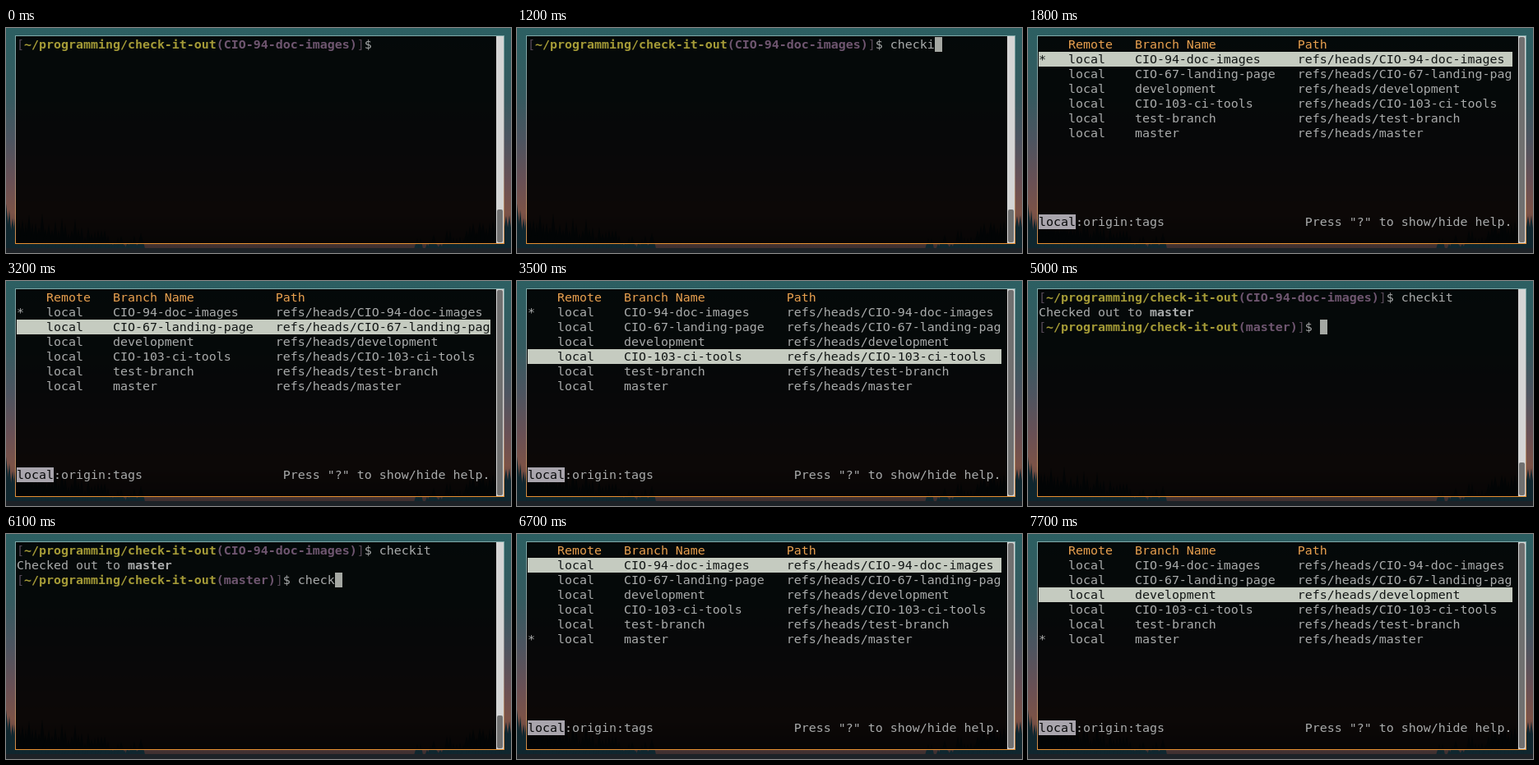
An HTML page with a canvas that plays this animation: 614 by 274 pixels, repeating every 8 s.

```html
<!DOCTYPE html>
<html lang="en">
<head>
<meta charset="utf-8">
<title>Branch picker in a terminal</title>
<style>
html, body { margin: 0; width: 100%; height: 100%; overflow: hidden; background: #12262c; }
canvas, #term, #thumb { position: absolute; }
canvas { left: 0; top: 0; }
#term {
  left: 13px; top: 11px; margin: 0; color: #a9abab;
  font: 14.95px/18px "DejaVu Sans Mono", monospace;
}
#term div { height: 18px; width: 576px; overflow: hidden; white-space: pre; }
#term span { display: inline-block; height: 18px; vertical-align: top; }
#term .dir { color: #a59b37; font-weight: bold; }
#term .branch { color: #6f5670; font-weight: bold; }
#term .edge { color: #574a58; }
#term .bold { font-weight: bold; }
#term .head { color: #e9a04f; }
#term .pick { background: #c5cbc0; color: #111514; }
#term .tab { background: #a9a5ad; color: #08090a; }
#term .cursor { background: #a5a8a3; }
#thumb { left: 597px; width: 7px; background: #707070; border-radius: 2px; }
</style>
</head>
<body>
<canvas id="scene" width="614" height="274"></canvas>
<pre id="term"></pre>
<div id="thumb"></div>
<script>
const LOOP = 8000;
const term = document.getElementById('term');
const thumb = document.getElementById('thumb');
const branches = ['CIO-94-doc-images', 'CIO-67-landing-page', 'development',
  'CIO-103-ci-tools', 'test-branch', 'master'];
const command = 'checkit';
const firstKeys = [400, 600, 800, 800, 1000, 1200, 1400];
const secondKeys = [...command].map((_, i) => 5700 + 100 * i);

function drawScene() {
  const g = document.getElementById('scene').getContext('2d');
  const gradient = (y0, y1, stops) => {
    const fill = g.createLinearGradient(0, y0, 0, y1);
    stops.forEach(([at, color]) => fill.addColorStop(at, color));
    return fill;
  };
  g.fillStyle = gradient(0, 274, [[0, '#2c5f62'], [.3, '#355a5f'], [.5, '#4d5460'],
    [.68, '#695055'], [.82, '#7c5347'], [.93, '#553c39'], [1, '#33292b']]);
  g.fillRect(0, 0, 614, 274);

  let seed = 7;
  const random = () => (seed = seed * 16807 % 2147483647) / 2147483647;
  const tree = (x, top) => {
    const w = 4 + random() * 3;
    g.beginPath();
    g.moveTo(x, top);
    g.lineTo(x + w, 274);
    g.lineTo(x - w, 274);
    g.fill();
  };
  g.fillStyle = '#10272f';
  for (let x = 0; x < 165; x += 4) tree(x, 222 + x * .2 + random() * 22 - 8);
  for (let x = 500; x < 620; x += 4) tree(x, 262 - (x - 500) * .25 + random() * 18 - 8);
  g.fillStyle = '#1d2227';
  g.fillRect(0, 268, 614, 6);

  g.fillStyle = 'rgba(0,0,0,.9)';
  g.fillRect(11, 9, 595, 254);
  g.strokeStyle = gradient(9, 263, [[0, '#7fa9a9'], [.6, '#95898a'], [.97, '#c98a4c'], [1, '#e8902f']]);
  g.strokeRect(11.5, 9.5, 594, 253);
  g.fillStyle = '#d5d5d5';
  g.fillRect(596, 10, 9, 252);
}

const span = (kind, text) => `<span class="${kind}">${text}</span>`;
const row = html => `<div>${html}</div>`;
const prompt = branch => span('edge', '[') + span('dir', '~/programming/check-it-out') +
  span('branch', `(${branch})`) + span('edge', ']') + '$ ';
const typed = (keys, t) => command.slice(0, keys.filter(k => k <= t).length);

function shell(t) {
  const cursor = span('cursor', ' ');
  const lines = [prompt(branches[0]) + typed(firstKeys, t)];
  let on = t >= 300;
  if (t >= 1600) lines.push('');
  if (t >= 5000) {
    lines[1] = 'Checked out to ' + span('bold', 'master');
    lines.push(prompt('master') + typed(secondKeys, t));
    on = t < 5500 || t >= 5700;
    if (t >= 6400) lines.push('');
  }
  if (on) lines[lines.length - 1] += cursor;
  return lines.map(row).join('');
}

function menu(current, picked) {
  const cells = (mark, remote, name, path) =>
    (mark.padEnd(4) + remote.padEnd(9) + name.padEnd(22) + path).slice(0, 64).padEnd(64);
  const list = branches.map((name, i) => {
    const text = cells(i === current ? '*' : '', 'local', name, 'refs/heads/' + name);
    return row(i === picked ? span('pick', text) : text);
  });
  return row(span('head', cells('', 'Remote', 'Branch Name', 'Path'))) + list.join('') +
    row('').repeat(5) +
    row(span('tab', 'local') + ':origin:tags'.padEnd(31) + 'Press "?" to show/hide help.');
}

const passed = (times, t) => times.filter(k => k <= t).length;

let shown = '';
function frame(now) {
  const t = now % LOOP;
  const first = t >= 1800 && t < 4900, second = t >= 6700;
  const html = first ? menu(0, passed([3200, 3300, 3500, 3700, 4000], t))
    : second ? menu(5, passed([7500, 7700], t))
    : shell(t);
  if (html !== shown) {
    term.innerHTML = shown = html;
    const full = first || second;
    thumb.style.top = (full ? 11 : 221) + 'px';
    thumb.style.height = (full ? 250 : 40) + 'px';
  }
  requestAnimationFrame(frame);
}

drawScene();
frame(0);
</script>
</body>
</html>
```
